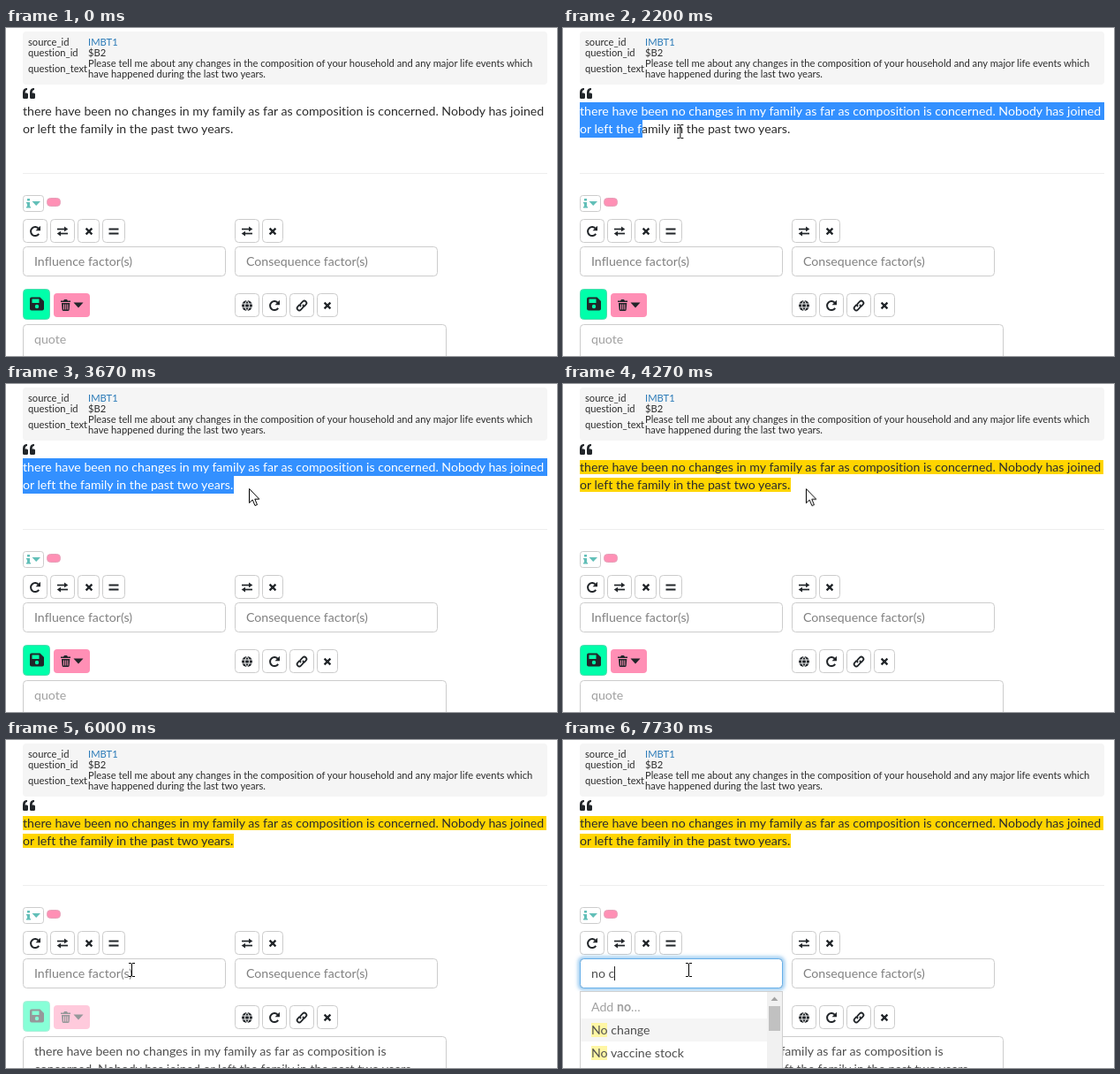
Animation, 624 px wide and 371 px high, one loop 8 s. Source, as an HTML page:

```html
<!DOCTYPE html>
<html lang="en">
<head>
<meta charset="utf-8">
<title>Coding a quote</title>
<style>
html, body { margin: 0; width: 100%; height: 100%; overflow: hidden; background: #fff; }
svg { display: block; width: 624px; height: 371px; }
text {
  font: 14.17px Lato, "Open Sans", sans-serif;
  font-variant-ligatures: none;
  fill: var(--ink, #2c2c2c);
  white-space: pre;
}
.small text { font-size: 11.19px; }
.white { --ink: #fff; }
.hint { --ink: #808080; }
.pale { --ink: #a0a0a0; }
.field { --ink: #505050; }
.box { fill: #fff; stroke: #ccc; }
.ink { fill: #212529; }
.line { fill: none; stroke: #212529; stroke-width: 2; }
.hit { fill: #fff6a4; }

/* one shared 8 s clock; 1% = 80 ms */
.t { animation: 8s linear infinite; }
.step { animation: 8s step-end infinite; }

#pointer { animation-name: path; }
#arrow { animation-name: arrow; }
#beam { animation-name: beam; }
#sel1 { animation-name: sel1; }
#sel2 { animation-name: sel2; }
#mark { animation-name: mark; }
.disable { animation-name: disable; }
#quoteHint { animation-name: quoteHint; }
#quoteText { animation-name: quoteText; }
.focus { animation-name: focus; }
#factorHint { animation-name: factorHint; }
#typed { animation-name: typed; }
#caret { animation-name: caret; }
#addN { animation-name: addN; }
#addNo { animation-name: addNo; }
.hit { animation-name: hit; }
#thumb { animation-name: thumb; }

@keyframes path {
  0%, 10.875% { transform: translate(11px, 33px); }
  12.5% { transform: translate(12px, 60px); }
  14.2% { transform: translate(16px, 84px); }
  15.1% { transform: translate(23px, 92px); }
  15.875%, 17.6% { transform: translate(27px, 90px); }
  19.125%, 20.1% { transform: translate(23px, 91px); }
  21.6%, 24.2% { transform: translate(22px, 91px); }
  25.8% { transform: translate(70px, 97px); }
  27.5% { transform: translate(132px, 117px); }
  30% { transform: translate(200px, 140px); }
  31.6% { transform: translate(232px, 157px); }
  33.4% { transform: translate(245px, 155px); }
  35%, 35.2% { transform: translate(250px, 146px); }
  37.5% { transform: translate(262px, 134px); }
  40% { transform: translate(284px, 124px); }
  42.5% { transform: translate(288px, 120px); }
  45.875%, 53.375% { transform: translate(275px, 118px); }
  55% { transform: translate(262px, 136px); }
  58% { transform: translate(218px, 184px); }
  61% { transform: translate(176px, 226px); }
  63.375%, 63.6% { transform: translate(159px, 240px); }
  66.6% { transform: translate(150px, 249px); }
  71.625%, 73.3% { transform: translate(142px, 258px); }
  75%, 100% { transform: translate(142px, 260px); }
}
@keyframes arrow {
  0% { opacity: 0; } 10.875% { opacity: 1; } 14.5% { opacity: 0; }
  42.5% { opacity: 1; } 66.2%, 100% { opacity: 0; }
}
@keyframes beam {
  0% { opacity: 0; } 14.5% { opacity: 1; } 42.5% { opacity: 0; }
  66.2%, 100% { opacity: 1; }
}
@keyframes sel1 {
  0% { width: 0; } 25% { width: 11px; } 25.8% { width: 51px; }
  26.6% { width: 594px; } 53.375%, 100% { width: 0; }
}
@keyframes sel2 {
  0% { width: 0; } 26.6% { width: 36px; } 27.5% { width: 71px; }
  28.375% { width: 126px; } 29.2% { width: 171px; } 30% { width: 211px; }
  30.9% { width: 239px; } 53.375%, 100% { width: 0; }
}
@keyframes mark { 0% { opacity: 0; } 53.375%, 100% { opacity: 1; } }
@keyframes disable { 0%, 67.5% { opacity: 1; } 69.5%, 100% { opacity: .47; } }
@keyframes quoteHint { 0% { opacity: 1; } 67.5%, 100% { opacity: 0; } }
@keyframes quoteText { 0% { opacity: 0; } 67.5%, 100% { opacity: 1; } }
@keyframes focus { 0% { opacity: 0; } 79.125%, 100% { opacity: 1; } }
@keyframes factorHint { 0% { opacity: 1; } 85.875%, 100% { opacity: 0; } }
@keyframes typed {
  0% { width: 0; } 85.875% { width: 9px; } 87.5% { width: 18px; }
  90% { width: 19px; } 96.625%, 100% { width: 28px; }
}
@keyframes caret {
  0% { transform: none; } 85.875% { transform: translateX(8px); }
  87.5% { transform: translateX(16px); } 90% { transform: translateX(19px); }
  96.625%, 100% { transform: translateX(26px); }
}
@keyframes addN { 0% { opacity: 0; } 85.875% { opacity: 1; } 88.375%, 100% { opacity: 0; } }
@keyframes addNo { 0% { opacity: 0; } 88.375%, 100% { opacity: 1; } }
@keyframes hit { 0% { width: 0; } 85.875% { width: 11px; } 88.375%, 100% { width: 18px; } }
@keyframes thumb { 0% { height: 18px; } 85.875%, 100% { height: 28px; } }
</style>
</head>
<body>
<svg viewBox="0 0 624 371" xmlns="http://www.w3.org/2000/svg">
  <defs>
    <g id="redo">
      <path class="line" d="M4 -3A5 5 0 1 0 4.2 2.9"/>
      <path class="ink" d="M6 -6.2V-.8H.6Z"/>
    </g>
    <g id="half">
      <path class="line" style="stroke-width:1.7" d="M-6 -2.5H3"/>
      <path class="ink" d="M2 -5.4L6.3 -2.5L2 .3Z"/>
    </g>
    <g id="swap"><use href="#half"/><use href="#half" transform="rotate(180)"/></g>
    <path id="cross" class="line" style="stroke-width:2.3" d="M-3.4 -3.4L3.4 3.4M3.4 -3.4L-3.4 3.4"/>
    <path id="equals" class="line" d="M-5.5 -2.5H5.5M-5.5 2.5H5.5"/>
    <g id="globe">
      <circle class="ink" r="6"/>
      <path fill="none" stroke="#fff" stroke-width=".9" d="M-6 -2H6M-6 2H6M0 -6Q-5 0 0 6Q5 0 0 -6"/>
    </g>
    <g id="link" transform="rotate(-45)">
      <path class="line" style="stroke-width:1.8" d="M-1 -2.5H-4A2.5 2.5 0 0 0 -4 2.5H-1A2.5 2.5 0 0 0 1.5 0M1 2.5H4A2.5 2.5 0 0 0 4 -2.5H1A2.5 2.5 0 0 0 -1.5 0"/>
    </g>
    <path id="tick" class="ink" d="M0 10.5V5Q0 0 5 0V2Q2.7 2 2.7 5.5H4.6Q6 5.5 6 7V10.5Q6 12 4.5 12H1.5Q0 12 0 10.5Z"/>
    <g id="answer">
      <text x="19" y="99">there have been no changes in my family as far as composition is concerned. Nobody has joined</text>
      <text x="19" y="119">or left the family in the past two years.</text>
    </g>
    <clipPath id="selection">
      <rect id="sel1" class="step" x="19" y="84" height="20"/>
      <rect id="sel2" class="step" x="19" y="104" height="20"/>
    </clipPath>
    <clipPath id="typing"><rect id="typed" class="step" x="31" y="250" height="28"/></clipPath>
    <filter id="glow" x="-10%" y="-40%" width="120%" height="180%"><feGaussianBlur stdDeviation="2"/></filter>
  </defs>

  <rect x="19" y="4" width="594" height="60" rx="4" fill="#f5f5f5"/>
  <g class="small">
    <text x="25" y="20">source_id</text>
    <text x="93" y="20" style="fill:#2a7ab8">IMBT1</text>
    <text x="25" y="32">question_id</text>
    <text x="93" y="32">$B2</text>
    <text x="25" y="50">question_text</text>
    <text x="93" y="44">Please tell me about any changes in the composition of your household and any major life events which</text>
    <text x="93" y="56">have happened during the last two years.</text>
  </g>

  <use href="#tick" x="19" y="68"/><use href="#tick" x="27" y="68"/>
  <path id="mark" class="step" fill="#ffd500" d="M19 86H612V102H19ZM19 106H258V122H19Z"/>
  <use href="#answer"/>
  <g clip-path="url(#selection)" class="white">
    <rect x="19" y="84" width="594" height="40" fill="#3390ff"/>
    <use href="#answer"/>
  </g>
  <rect x="19" y="164" width="594" height="1" fill="#eee"/>

  <rect class="box" x="19.5" y="189.5" width="23" height="18" rx="3"/>
  <path fill="#62bfb8" d="M24 193H27V195.500H24ZM23 197H27V202H28V203.500H23V202H24V198.500H23ZM29.500 196H39L34.200 201Z"/>
  <rect x="46.5" y="192.5" width="15" height="9" rx="4" fill="#ff90b5" stroke="#e5a0b8"/>

  <g class="box">
    <rect x="19.5" y="216.5" width="27" height="26" rx="4"/>
    <rect x="50.5" y="216.5" width="27" height="26" rx="4"/>
    <rect x="81.5" y="216.5" width="24" height="26" rx="4"/>
    <rect x="109.5" y="216.5" width="25" height="26" rx="4"/>
    <rect x="259.5" y="216.5" width="27" height="26" rx="4"/>
    <rect x="290.5" y="216.5" width="23" height="26" rx="4"/>
    <rect x="259.5" y="300.5" width="27" height="26" rx="4"/>
    <rect x="290.5" y="300.5" width="27" height="26" rx="4"/>
    <rect x="321.5" y="300.5" width="27" height="26" rx="4"/>
    <rect x="352.5" y="300.5" width="23" height="26" rx="4"/>
    <rect x="259.5" y="247.5" width="229" height="33" rx="4"/>
    <rect x="19.5" y="335.5" width="479" height="60" rx="4"/>
  </g>
  <use href="#redo" x="33" y="230"/><use href="#swap" x="64" y="230"/>
  <use href="#cross" x="94" y="230"/><use href="#equals" x="122" y="230"/>
  <use href="#swap" x="273" y="230"/><use href="#cross" x="302" y="230"/>
  <use href="#globe" x="273" y="314"/><use href="#redo" x="304" y="314"/>
  <use href="#link" x="0" y="0" transform="translate(335 314)"/><use href="#cross" x="364" y="314"/>
  <text class="hint" x="272" y="269">Consequence factor(s)</text>

  <g class="disable t">
    <rect x="19.5" y="295.5" width="30" height="34" rx="4" fill="#00ffaa" stroke="#4fdcae"/>
    <path class="ink" d="M29 304.500H38.500L43 309V317.500Q43 319.500 41 319.500H29Q27 319.500 27 317.500V306.500Q27 304.500 29 304.500Z"/>
    <path fill="#00ffaa" d="M29.500 306.500H37.500V311H29.500Z"/>
    <circle cx="35" cy="315" r="2.2" fill="#00ffaa"/>
    <rect x="54" y="300" width="41" height="27" rx="4" fill="#ff8fb5"/>
    <path class="ink" d="M62 308.500H65L66 307H69L70 308.500H73V310H62ZM63 311H72.300L71.700 318.500Q71.600 320 70 320H65.200Q63.700 320 63.600 318.500ZM76.500 310.500H87.500L82 316.500Z"/>
    <path stroke="#ff8fb5" d="M65.500 312.500V318.500M67.700 312.500V318.500M69.900 312.500V318.500"/>
  </g>

  <text id="quoteHint" class="pale step" x="32" y="357">quote</text>
  <g id="quoteText" class="field step">
    <text x="32" y="357">there have been no changes in my family as far as composition is</text>
    <text x="32" y="377">concerned. Nobody has joined or left the family in the past two years.</text>
  </g>

  <rect class="focus step" x="19" y="247" width="230" height="34" rx="4" fill="none" stroke="#66afe9" stroke-width="3" filter="url(#glow)"/>
  <rect class="box" x="19.5" y="247.5" width="229" height="33" rx="4"/>
  <text id="factorHint" class="hint step" x="32" y="269">Influence factor(s)</text>

  <g class="focus field step">
    <rect x="19.5" y="247.5" width="229" height="33" rx="4" fill="none" stroke="#66afe9"/>
    <text x="32" y="269" clip-path="url(#typing)">no c</text>
    <rect id="caret" class="step" x="32" y="256" width="1" height="16" fill="#222"/>

    <rect x="19.5" y="284.5" width="229" height="110" fill="#fff" stroke="#d0d0d0"/>
    <rect x="20" y="315" width="211" height="26" fill="#f5f5f5"/>
    <rect class="hit step" x="32" y="320" height="16"/>
    <rect class="hit step" x="32" y="346" height="16"/>
    <text id="addN" class="pale step" x="32" y="307">Add <tspan font-weight="700">n</tspan>…</text>
    <text id="addNo" class="pale step" x="32" y="307">Add <tspan font-weight="700">no</tspan>…</text>
    <text x="32" y="333">No change</text>
    <text x="32" y="359">No vaccine stock</text>
    <rect x="231" y="285" width="17" height="90" fill="#f1f1f1"/>
    <path fill="#a3a3a3" d="M235.500 295H243.500L239.500 290.500Z"/>
    <rect id="thumb" class="step" x="233" y="301" width="13" height="28" fill="#c1c1c1"/>
  </g>

  <g id="pointer" class="t">
    <path id="arrow" class="step" fill="#fff" stroke="#000" d="M.5 .5V16.500L4.200 13L7 19.500L9.500 18.500L6.800 12.200H11.800Z"/>
    <path id="beam" class="step" fill="none" stroke="#000" d="M-3 -7.500H0M1 -7.500H4M.5 -7V7M-3 7.500H0M1 7.500H4"/>
  </g>
</svg>
</body>
</html>
```
